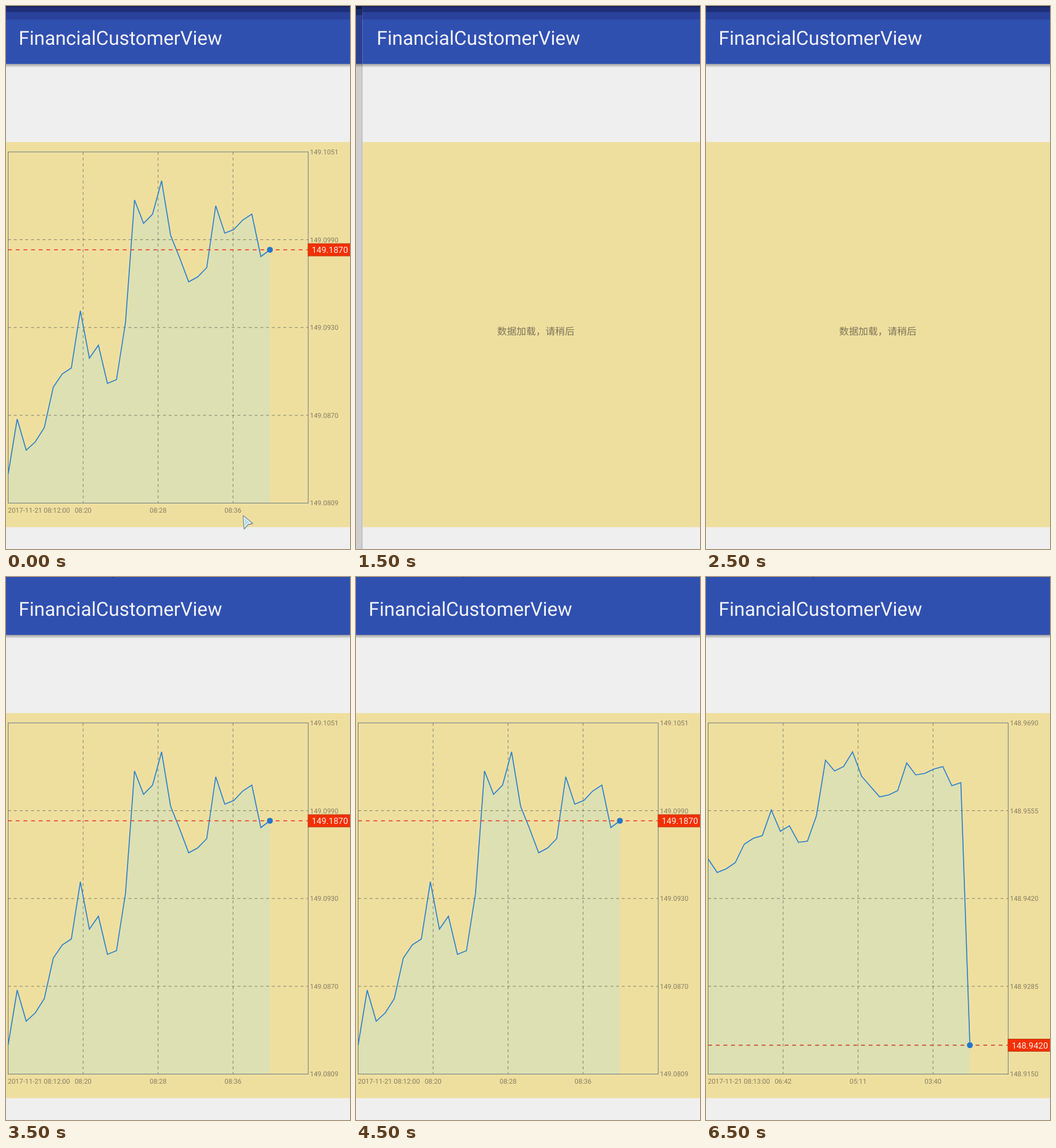
An HTML page that plays this animation: 558 by 882 pixels, repeating every 8 s.

```html
<!DOCTYPE html>
<html lang="zh">
<head>
<meta charset="utf-8">
<style>
  html, body { margin: 0; width: 100%; height: 100%; overflow: hidden; background: #efefef; }
  svg { display: block; width: 558px; height: 882px; }
  text { font-family: Roboto, sans-serif; text-rendering: geometricPrecision; }
  .cjk { font-family: "Noto Sans CJK SC", "Noto Sans CJK", sans-serif; }
  .label { font-size: 11px; fill: #877f62; }
  .title { font-size: 31.4px; fill: #f1f2f8; }
  .button { font-size: 22px; fill: #161616; stroke: #161616; stroke-width: .6; }
  .grid { fill: none; stroke: #80806c; stroke-width: 1; stroke-dasharray: 4.65; }
</style>
</head>
<body>
<svg id="stage" viewBox="0 0 558 882">
  <defs>
    <linearGradient id="drop" x1="0" y1="0" x2="0" y2="1">
      <stop offset="0" stop-color="#000" stop-opacity=".34"/>
      <stop offset="1" stop-color="#000" stop-opacity="0"/>
    </linearGradient>
  </defs>
</svg>
<script>
const LOOP = 8000;
const stage = document.getElementById('stage');

function add(parent, tag, attrs = {}, content) {
  const el = document.createElementNS('http://www.w3.org/2000/svg', tag);
  for (const key in attrs) el.setAttribute(key, attrs[key]);
  if (content) el.textContent = content;
  parent.appendChild(el);
  return el;
}
const group = (parent = stage) => add(parent, 'g');
const rect = (parent, x, y, width, height, fill) => add(parent, 'rect', { x, y, width, height, fill });
const text = (parent, x, y, cls, content, extra) => add(parent, 'text', { x, y, class: cls, ...extra }, content);
const middle = { 'text-anchor': 'middle' };

// Dimmed page left behind by the slide
function buildBehind() {
  const g = group();
  rect(g, 0, 0, 12, 882, '#cfcfcf');
  rect(g, 0, 0, 12, 94, '#2c408f');
  rect(g, 0, 0, 12, 15, '#1c2b68');
  rect(g, 0, 0, 12, 5, '#111b47');
  rect(g, 0, 94, 12, 6, 'url(#drop)');
  rect(g, 9, 0, 2, 882, 'rgba(0,0,0,.1)');
  return g;
}

function buildBar() {
  const g = group();
  rect(g, -2.5, 0, 570, 94, '#3050b0');
  rect(g, -2.5, 94, 570, 6, 'url(#drop)');
  text(g, 20.6, 63, 'title', 'FinancialCustomerView');
  return g;
}

function buildStatus() {
  const g = group();
  rect(g, -2.5, 0, 570, 22, '#2a429c');
  rect(g, -2.5, 0, 570, 10, '#203078');
  rect(g, -2.5, 0, 570, 2, '#18235a');
  return g;
}

function buildMenu() {
  const g = group();
  const items = [[178, 459, 201, '去自定义基金页面'], [200, 535, 157, '去分时图页面']];
  for (const [x, y, w] of items) {
    rect(g, x - .5, y - .5, w + 1, 76.5, 'rgba(0,0,0,.07)');
    add(g, 'rect', { x, y: y + 75, width: w, height: 3, fill: 'url(#drop)', opacity: .6 });
  }
  for (const [x, y, w, name] of items) {
    rect(g, x, y, w, 75.5, '#d0d0d0');
    text(g, 278.5, y + 45, 'cjk button', name, middle);
  }
  return g;
}

function buildLoading() {
  const g = group();
  text(g, 216, 534, 'cjk', '数据加载，请稍后', { 'font-size': 15.7, fill: '#7d7558' });
  return g;
}

function buildChart({ ys, prices, times, tag, red }) {
  const g = group();
  const points = ys.map((y, i) => [3.5 + i * 14.64, y]);
  const path = 'M' + points.map(p => p.join(' ')).join('L');
  const [endX, endY] = points[points.length - 1];

  add(g, 'path', { d: `${path}V807.5H3.5Z`, fill: 'rgba(192,224,208,.38)' });
  for (let i = 1; i < 4; i++) {
    const x = 3.5 + i * 121.6, y = 237 + i * 142.6;
    add(g, 'path', { class: 'grid', d: `M3.5 ${y}H490M${x} 237V807` });
  }
  add(g, 'rect', { x: 3.5, y: 237, width: 486.7, height: 570.4, fill: 'none', stroke: '#6d7f87' });
  add(g, 'path', { d: path, fill: 'none', stroke: '#2a80d0', 'stroke-width': 1.6 });
  add(g, 'path', { d: `M3.5 ${endY}H490`, stroke: red, 'stroke-width': 1.7, 'stroke-dasharray': 6.2 });
  add(g, 'circle', { cx: endX, cy: endY, r: 4.8, fill: '#2675c9' });

  prices.forEach((p, i) => text(g, 493, 241 + i * 142.6, 'label', p));
  times.forEach((t, i) => text(g, i ? 3.5 + i * 121.6 : 3, 823, 'label', t, i ? middle : {}));
  rect(g, 489.5, endY - 10.5, 69, 21, '#b8401a');
  rect(g, 490.5, endY - 9.5, 68, 19, '#f42f02');
  text(g, 496, endY + 5, '', tag, { 'font-size': 14, fill: '#fff0e8' });
  return g;
}

function buildCursor() {
  const g = group();
  add(g, 'path', {
    d: 'M385 828.5L399.5 840.5L392.5 842L386.5 849Z',
    fill: '#b9dcea', stroke: '#87999f', 'stroke-width': 2.4, 'stroke-linejoin': 'round'
  });
  add(g, 'path', {
    d: 'M386 830.5L397 839.7L391.8 841L387.3 846.3Z',
    fill: '#b9dcea', stroke: '#f4fafc', 'stroke-width': 1.2
  });
  return g;
}

const behind = buildBehind();
const page = group();
rect(page, -2.5, 0, 570, 882, '#efefef');
const panel = rect(page, -2, 221, 570, 625.5, '#efdf9f');
const bar = buildBar();
const status = buildStatus();
const menu = buildMenu();
const loading = buildLoading();
const early = buildChart({
  ys: [760, 671, 721.5, 708, 685, 619, 597.5, 588, 495, 572, 551, 613, 607, 514, 315,
    353, 338, 284, 372.5, 409, 448, 440, 425, 324.5, 369, 363, 347.5, 338, 407, 396],
  prices: ['149.1051', '149.0990', '149.0930', '149.0870', '149.0809'],
  times: ['2017-11-21 08:12:00', '08:20', '08:28', '08:36'],
  tag: '149.1870', red: '#ee3a22'
});
const late = buildChart({
  ys: [458, 480, 474, 464, 434, 424.5, 420, 378.5, 413, 404, 431, 429, 387.5, 297.5, 315,
    308, 284, 323.5, 340.5, 357, 354, 347, 302, 321.5, 319, 312, 308, 339, 334, 760.5],
  prices: ['148.9690', '148.9555', '148.9420', '148.9285', '148.9150'],
  times: ['2017-11-21 08:13:00', '06:42', '05:11', '03:40'],
  tag: '148.9420', red: '#c53a26'
});
const cursor = buildCursor();
const notch = rect(stage, 172, 0, 4, 1, '#22367f');
page.append(bar, status, menu, loading, early, late);

const show = (el, on) => el.setAttribute('visibility', on ? 'visible' : 'hidden');

function render(t) {
  const inMenu = t >= 500 && t < 1500;
  const sliding = t >= 1500 && t < 2500;
  page.setAttribute('transform', `translate(${sliding ? 13 : 0} 0)`);
  show(behind, sliding);
  show(panel, !inMenu);
  show(status, t < 3000);
  show(menu, inMenu);
  show(loading, t >= 1500 && t < 3000);
  show(early, t < 500 || (t >= 3000 && t < 6500));
  show(late, t >= 6500);
  show(cursor, t < 500);
  show(notch, t >= 3000);
}

const start = performance.now();
function tick() {
  render((performance.now() - start) % LOOP);
  requestAnimationFrame(tick);
}
tick();
</script>
</body>
</html>
```
